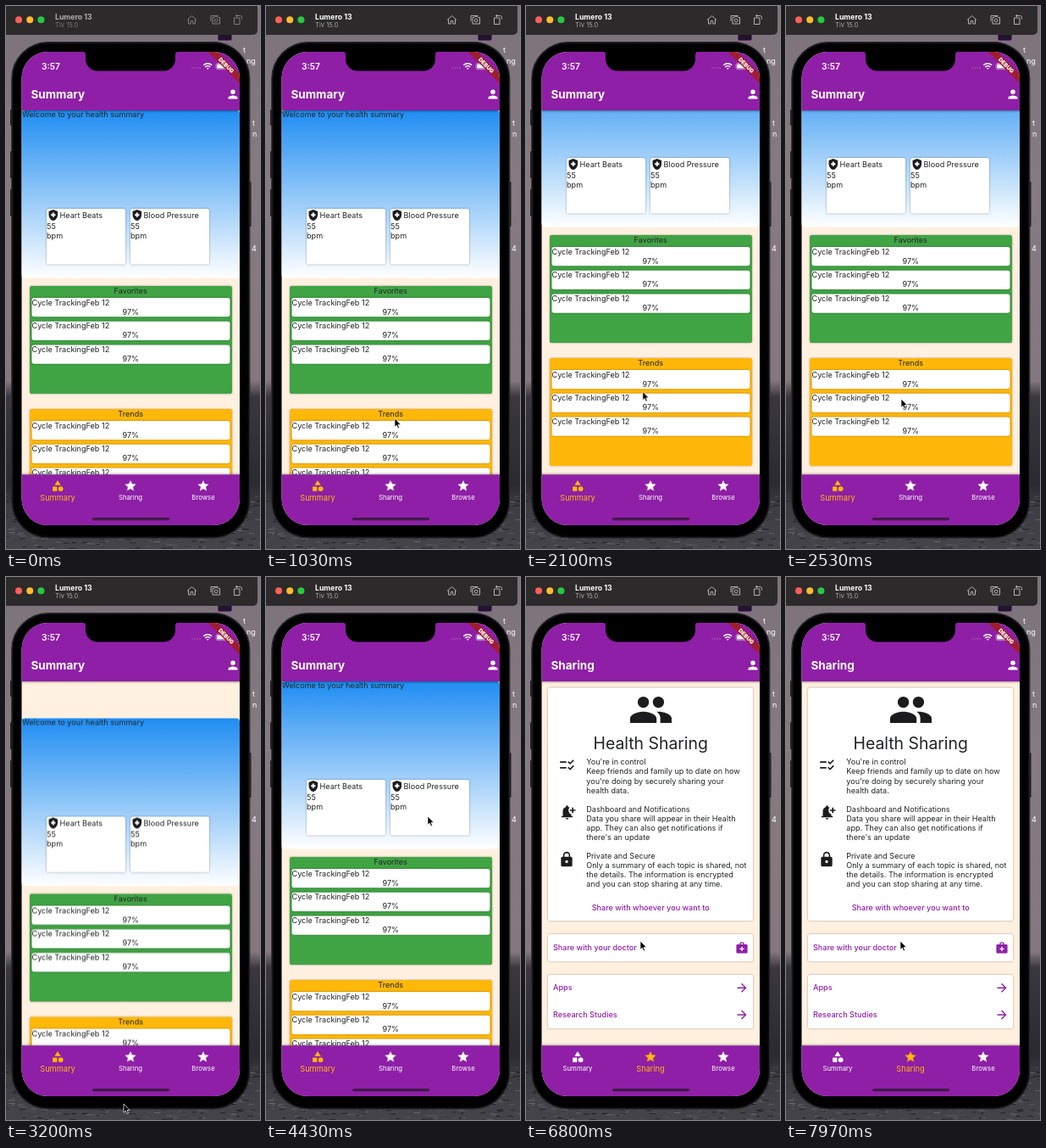
An HTML page for the animation above (8000 ms loop, 300 by 640 pixels).

```html
<!DOCTYPE html>
<html lang="en">
<head>
<meta charset="utf-8">
<title>Health summary app</title>
<style>
html, body { margin: 0; width: 100%; height: 100%; overflow: hidden; background: #2c292b; }
svg { display: block; width: 100vw; height: 100vh; font-family: Inter, Roboto, sans-serif; }
text { font-size: 9.1px; fill: #212525; white-space: pre; }
.mid { text-anchor: middle; }
.link { fill: #8e1fa6; font-weight: 500; }
.heading { font-size: 13.5px; font-weight: 700; fill: #fff; }
.card { filter: drop-shadow(0 .7px .8px rgba(0, 0, 0, .36)); }
.icon { fill: #1c1c1e; fill-rule: evenodd; }
.purple { fill: #8e1fa6; }
.white { fill: #fff; }

.focus { animation: focus 8s step-end infinite; }
.scroll { animation: scroll 8s linear infinite; }
.first { animation: first 8s step-end infinite; }
.second { animation: second 8s step-end infinite; }
.cursor { animation: cursor 8s ease-in-out infinite; }
.tab text { font-size: 7.75px; fill: inherit; transform-box: fill-box; transform-origin: center; }
.tab .icon { fill: inherit; }
.tab { fill: #fff; }
.leaving { animation: unlit 8s infinite; }
.leaving text { animation: shrink 8s infinite; }
.entering { animation: lit 8s infinite; }
.entering text { animation: grow 8s infinite; }

@keyframes focus { 0% { opacity: .62 } 12%, 100% { opacity: 1 } }
@keyframes first { 0% { visibility: visible } 69.9%, 100% { visibility: hidden } }
@keyframes second { 0% { visibility: hidden } 69.9%, 100% { visibility: visible } }
@keyframes scroll {
  0%, 13.75% { transform: translateY(0) }
  17% { transform: translateY(-60px) }
  19.1%, 20% { transform: translateY(-79px); animation-timing-function: cubic-bezier(.2, .6, .3, 1) }
  27%, 31.7% { transform: translateY(-60px) }
  36% { transform: translateY(0) }
  40%, 41.5% { transform: translateY(43.5px); animation-timing-function: cubic-bezier(.25, .5, .3, 1) }
  49.5%, 100% { transform: translateY(0) }
}
@keyframes cursor {
  0%, 4% { transform: translate(304px, 420px) }
  11.5%, 13.75% { transform: translate(152px, 486px); animation-timing-function: linear }
  17% { transform: translate(152px, 426px); animation-timing-function: linear }
  19.1%, 20.5% { transform: translate(152px, 386px) }
  28%, 31.7% { transform: translate(136px, 463px); animation-timing-function: linear }
  36% { transform: translate(137px, 523px); animation-timing-function: linear }
  40%, 41.5% { transform: translate(139px, 621px) }
  53%, 57% { transform: translate(191px, 282px) }
  67.5%, 73.5% { transform: translate(147px, 580px) }
  84%, 100% { transform: translate(135px, 429px) }
}
@keyframes unlit {
  0%, 70.3% { fill: #ffb80a; animation-timing-function: cubic-bezier(.4, 0, .2, 1) }
  72.8%, 100% { fill: #fff }
}
@keyframes lit {
  0%, 70.3% { fill: #fff; animation-timing-function: cubic-bezier(.4, 0, .2, 1) }
  72.8%, 100% { fill: #ffb80a }
}
@keyframes shrink {
  0%, 70.3% { transform: scale(1.19); animation-timing-function: cubic-bezier(.4, 0, .2, 1) }
  72.8%, 100% { transform: scale(1) }
}
@keyframes grow {
  0%, 70.3% { transform: scale(1); animation-timing-function: cubic-bezier(.4, 0, .2, 1) }
  72.8%, 100% { transform: scale(1.19) }
}
</style>
</head>
<body>
<svg id="stage" viewBox="0 0 300 640" preserveAspectRatio="none"></svg>
<script>
const glyphs = {
  shapes: 'M12 2l-5.5 9h11zM13 17.5a4.5 4.5 0 1 0 9 0a4.5 4.5 0 1 0-9 0zM3 13.5h8v8H3z',
  star: 'M12 17.27L18.18 21l-1.64-7.03L22 9.24l-7.19-.61L12 2 9.19 8.63 2 9.24l5.46 4.73L5.82 21z',
  person: 'M12 12a4 4 0 1 0 0-8a4 4 0 0 0 0 8zm0 2c-2.67 0-8 1.34-8 4v2h16v-2c0-2.66-5.33-4-8-4z',
  shield: 'M10.5 13H8v-3h2.5V7.5h3V10H16v3h-2.5v2.5h-3zM12 2L4 5v6.09c0 5.05 3.41 9.76 8 10.91 4.59-1.15 8-5.86 8-10.91V5z',
  people: 'M16 11a3 3 0 1 0 0-6a3 3 0 0 0 0 6zm-8 0a3 3 0 1 0 0-6a3 3 0 0 0 0 6zm0 2c-2.33 0-7 1.17-7 3.5V19h14v-2.5c0-2.33-4.67-3.5-7-3.5zm8 0c-.29 0-.62.02-.97.05 1.16.84 1.97 1.97 1.97 3.45V19h6v-2.5c0-2.33-4.67-3.5-7-3.5z',
  checks: 'M2 7h9v2H2zM2 15h9v2H2zM16.3 11.5L12.8 8l1.4-1.4 2.1 2.1L20.6 4.4 22 5.8zM16.3 19.5L12.8 16l1.4-1.4 2.1 2.1 4.3-4.3 1.4 1.4z',
  bell: 'M10 20h4a2 2 0 0 1-4 0zm4-11c0 2.6 1.7 4.8 4 5.65V17h2v2H4v-2h2v-7c0-2.79 1.91-5.14 4.5-5.8v-.7a1.5 1.5 0 0 1 3 0v.7c.71.18 1.36.49 1.95.9A5.9 5.9 0 0 0 14 9zM24 8h-3V5h-2v3h-3v2h3v3h2v-3h3z',
  lock: 'M18 8h-1V6A5 5 0 0 0 7 6v2H6a2 2 0 0 0-2 2v10a2 2 0 0 0 2 2h12a2 2 0 0 0 2-2V10a2 2 0 0 0-2-2zm-6 9a2 2 0 1 1 0-4a2 2 0 0 1 0 4zm3.1-9H8.9V6a3.1 3.1 0 0 1 6.2 0z',
  medkit: 'M20 6h-4V4a2 2 0 0 0-2-2h-4a2 2 0 0 0-2 2v2H4a2 2 0 0 0-2 2v12a2 2 0 0 0 2 2h16a2 2 0 0 0 2-2V8a2 2 0 0 0-2-2zM10 4h4v2h-4zm6 11h-3v3h-2v-3H8v-2h3v-3h2v3h3z',
  arrow: 'M12 4l-1.41 1.41L16.17 11H4v2h12.17l-5.58 5.59L12 20l8-8z'
};

const text = (x, y, str, cls = '') => `<text x="${x}" y="${y}" class="${cls}">${str}</text>`;
const lines = (x, y, rows) => rows.map((row, i) => text(x, y + i * 11.15, row)).join('');
const rect = (x, y, w, h, fill, r = 0, extra = '') =>
  `<rect x="${x}" y="${y}" width="${w}" height="${h}" rx="${r}" fill="${fill}" ${extra}/>`;
const card = (x, y, w, h, fill = '#fff') => rect(x, y, w, h, fill, 2.6, 'class="card"');
const icon = (name, cx, cy, size, cls = '') =>
  `<path class="icon ${cls}" d="${glyphs[name]}" transform="translate(${cx - size / 2} ${cy - size / 2}) scale(${size / 24})"/>`;

let seed = 7;
const random = () => (seed = seed * 16807 % 2147483647) / 2147483647;

function wallpaper() {
  let out = rect(0, 0, 300, 640, 'url(#sky)');
  for (let i = 0; i < 420; i++) {
    const y = 575 + random() * 65, shade = 22 + Math.floor(random() * 90);
    out += rect(random() * 304 - 4, y, 2 + random() * 6, 1, `rgb(${shade},${shade},${shade + 5})`);
  }
  out += rect(250, 28, 17, 13, '#21152b', 2, 'stroke="#a35fb5" stroke-width=".8"');
  const labels = [[280, 55, 't'], [284, 68, 'ng'], [291, 141, 't'], [291, 154, 'n'], [290, 289, '4']];
  return out + labels.map(label => text(...label, 'white')).join('');
}

function titleBar() {
  const lights = ['#fe5f57', '#febc2e', '#28c840']
    .map((color, i) => `<circle cx="${15 + i * 13.2}" cy="16.3" r="4" fill="${color}"/>`).join('');
  return `<path d="M0 0H297V29a5 5 0 0 1-5 5H0z" fill="#2d2a2c"/>${lights}
    <g class="focus">
      <text x="58" y="15.5" style="font-size:8.7px;font-weight:700;fill:#fff">Lumero 13</text>
      <text x="58" y="25" style="font-size:7.6px;fill:#a9a6a8">Tiv 15.0</text>
      <g fill="none" stroke="#b2afb1" stroke-width="1" stroke-linejoin="round">
        <path d="M214 16.5l5.5-5 5.5 5M215.5 15.5v5.5h2.7v-3.5h2.6v3.5h2.7v-5.5"/>
        <path d="M242 18v-6.5h8.5M244 13.5h2l1-1.3h2.5l1 1.3h2v7.5h-8.5z"/><circle cx="248.2" cy="17" r="1.9"/>
        <path d="M269.5 14h6.5v7.5h-6.5zM271.5 11.5h5a2 2 0 0 1 2 2v2M273 10l-1.7 1.5 1.7 1.5"/>
      </g>
    </g>`;
}

function phone() {
  const buttons = [[5, 122, 19], [5, 171, 32], [5, 216, 32], [286.5, 207, 53]]
    .map(([x, y, h]) => rect(x, y, 3, h, '#1a1a1d', 1)).join('');
  return buttons + rect(6.8, 42.6, 281, 584.4, '#0b0b0d', 43, 'stroke="#2b2b30" stroke-width="1.2"')
    + rect(9, 44.8, 276.6, 580, '#000', 41);
}

function metric(x, name) {
  return card(x, 239, 93, 65.5) + icon('shield', x + 7.8, 246.5, 15.8)
    + text(x + 15.6, 249.8, name) + lines(x, 263.3, ['55', 'bpm']);
}

function group(y, title, color) {
  let out = card(28, y, 239, 127, color) + text(147.2, y + 8.7, title, 'mid');
  for (let i = 0; i < 3; i++) {
    const top = y + 14 + i * 27.75;
    out += card(30.5, top, 234, 22.2) + text(30.5, top + 8.5, 'Cycle TrackingFeb 12')
      + text(147.2, top + 19.6, '97%', 'mid');
  }
  return out;
}

function summary() {
  return `<g class="first"><g class="scroll">${rect(18.5, 123, 257.5, 197.5, 'url(#blue)', 4)}
    ${text(19, 131.3, 'Welcome to your health summary')}
    ${metric(48, 'Heart Beats')}${metric(147, 'Blood Pressure')}
    ${group(330, 'Favorites', '#40a445')}${group(475, 'Trends', '#ffb80a')}</g></g>`;
}

function sharing() {
  return `<g class="second">${card(26, 130.5, 242, 274.5)}
    ${icon('people', 147.5, 156.5, 53.5)}
    <text x="147.2" y="202.5" class="mid" style="font-size:19.4px">Health Sharing</text>
    ${icon('checks', 48.5, 221.5, 20)}${icon('bell', 48.5, 277.5, 20)}${icon('lock', 48, 333, 20)}
    ${lines(71.3, 221.2, ["You're in control", 'Keep friends and family up to date on how', "you're doing by securely sharing your", 'health data.'])}
    ${lines(71.3, 276.6, ['Dashboard and Notifications', 'Data you share will appear in their Health', 'app. They can also get notifications if', "there's an update"])}
    ${lines(71.3, 332, ['Private and Secure', 'Only a summary of each topic is shared, not', 'the details. The information is encrypted', 'and you can stop sharing at any time.'])}
    ${text(147.2, 392.5, 'Share with whoever you want to', 'link mid')}
    ${card(26, 421, 242, 32)}${text(32, 440, 'Share with your doctor', 'link')}${icon('medkit', 255, 437, 15.8, 'purple')}
    ${card(26, 469, 242, 63)}${text(32, 487.4, 'Apps', 'link')}${text(32, 519.2, 'Research Studies', 'link')}
    ${icon('arrow', 255, 484.3, 16.5, 'purple')}${icon('arrow', 255, 516, 16.5, 'purple')}</g>`;
}

function appBar() {
  const dots = [220, 223, 226, 229].map(x => `<circle cx="${x}" cy="73" r=".7" fill="#b673c5"/>`).join('');
  return `<g style="filter:drop-shadow(0 1.3px 1.3px rgba(0,0,0,.4))">${rect(18, 53, 259, 70, '#8e1fa6')}</g>
    <text x="42" y="75" class="white" style="font-size:10.2px;font-weight:600">3:57</text>${dots}
    <g fill="none" stroke="#fff" stroke-width="1.5">
      <path d="M233.3 69.7a7 7 0 0 1 9.8 0M235.2 72a4.3 4.3 0 0 1 6 0"/>
      <path d="M238.2 75l-1.3-1.5a1.8 1.8 0 0 1 2.6 0z" fill="#fff" stroke="none"/>
      <rect x="248" y="67.5" width="14" height="7.2" rx="2" stroke="#d3a6dc" stroke-width=".7"/>
    </g>${rect(249.1, 68.6, 11.8, 5, '#fff', 1.2)}
    ${text(29.5, 109, 'Summary', 'heading first')}${text(29.5, 109, 'Sharing', 'heading second')}
    ${icon('person', 268, 104, 16.5, 'white')}
    <g transform="translate(276 54) rotate(45)">${rect(-26.4, 18.5, 52.8, 7.9, '#a01c30')}
      <text y="24.8" class="white mid" style="font-size:6.5px;font-weight:900">DEBUG</text></g>`;
}

function navBar() {
  const tab = (x, name, glyph, cls) =>
    `<g class="tab ${cls}">${icon(glyph, x, 565.5, 15.8)}${text(x, 582, name, 'mid')}</g>`;
  return `<g style="filter:drop-shadow(0 -.5px 1.2px rgba(0,0,0,.3))">${rect(18, 552.3, 259, 61, '#8e1fa6')}</g>`
    + tab(61, 'Summary', 'shapes', 'leaving') + tab(147, 'Sharing', 'star', 'entering')
    + tab(233, 'Browse', 'star', '') + rect(102, 603, 91, 3.2, '#401a48', 1.6);
}

document.getElementById('stage').innerHTML = `
  <defs>
    <linearGradient id="sky" x2="0" y2="1">
      <stop offset=".05" stop-color="#7d737a"/><stop offset=".3" stop-color="#857a80"/>
      <stop offset=".69" stop-color="#84787e"/><stop offset=".72" stop-color="#3a373f"/>
      <stop offset=".88" stop-color="#2a2a30"/><stop offset=".92" stop-color="#3c3c42"/><stop offset="1" stop-color="#44444a"/>
    </linearGradient>
    <linearGradient id="blue" x2="0" y2="1"><stop stop-color="#1f8df2"/><stop offset="1" stop-color="#fff"/></linearGradient>
    <clipPath id="screen"><rect x="18.5" y="54" width="257.5" height="558" rx="31"/></clipPath>
    <clipPath id="body"><rect x="18.5" y="122" width="257.5" height="431"/></clipPath>
  </defs>
  ${wallpaper()}${titleBar()}${phone()}
  <g clip-path="url(#screen)">
    ${rect(18, 53, 259, 560, '#fff0e0')}
    <g clip-path="url(#body)">${summary()}${sharing()}</g>
    ${appBar()}${navBar()}
  </g>
  <path d="M90 53.5q4 0 4 4v5a14 14 0 0 0 14 14h78a14 14 0 0 0 14-14v-5q0-4 4-4z"/>
  <path class="cursor" d="M0 0v10.2l2.3-2.1 1.5 3.6 1.7-.7-1.5-3.5h3.2z" stroke="#fff" stroke-width=".7"/>`;
</script>
</body>
</html>
```
